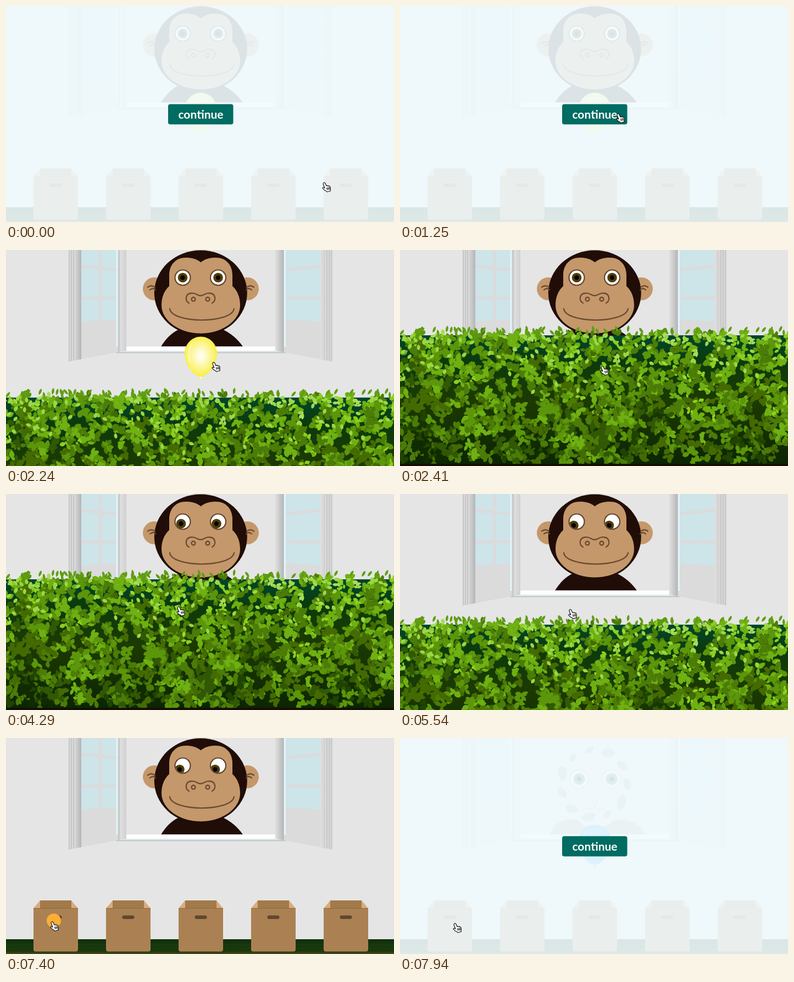
These frames come from a looping animation (706 px wide and 395 px high, 8 s). An HTML page:

```html
<!DOCTYPE html>
<html lang="en">
<head>
<meta charset="utf-8">
<title>Find the balloon</title>
<style>
html, body { margin: 0; width: 100%; height: 100%; overflow: hidden; background: #e5e5e5; }
svg { display: block; width: 100vw; height: 100vh; }
</style>
</head>
<body>
<svg viewBox="0 0 706 395">
  <defs>
    <linearGradient id="grass" x2="0" y2="1">
      <stop offset="0" stop-color="#0f2c0c"/><stop offset=".35" stop-color="#17390f"/>
      <stop offset=".85" stop-color="#1d3a0e"/><stop offset="1" stop-color="#54491a"/>
    </linearGradient>
    <linearGradient id="shade"><stop offset="0" stop-color="#d8d8d8"/><stop offset="1" stop-color="#b3b5b6"/></linearGradient>
    <linearGradient id="light"><stop offset="0" stop-color="#e0e0e0"/><stop offset="1" stop-color="#d0d0d0"/></linearGradient>
    <linearGradient id="soil" x2="0" y2="1">
      <stop offset="0" stop-color="#00462c"/><stop offset=".2" stop-color="#0c3a0c"/>
      <stop offset=".5" stop-color="#1c3a02"/><stop offset="1" stop-color="#0b2403"/>
    </linearGradient>
    <radialGradient id="yellow" cy=".48" r=".56">
      <stop offset="0" stop-color="#fffff4"/><stop offset=".18" stop-color="#fefce0"/>
      <stop offset=".75" stop-color="#faf267"/><stop offset="1" stop-color="#f8ee35"/>
    </radialGradient>
    <radialGradient id="blue" cy=".48" r=".56">
      <stop offset="0" stop-color="#6cc8f4"/><stop offset="1" stop-color="#0aa0f0"/>
    </radialGradient>
    <clipPath id="eyeClip"><circle r="13"/></clipPath>
    <g id="box">
      <path d="M12 297H69V312H12Z" fill="#a27a4b"/>
      <path d="M0 311.5L12 297V311.5ZM81 311.5L69 297V311.5Z" fill="#d9ac7d"/>
      <path d="M0 311H81V386.5Q81 390.5 77 390.5H4Q0 390.5 0 386.5Z" fill="#ab8153"/>
      <path d="M0 311.5H81" stroke="#8d683e"/>
      <rect x="29.5" y="324.5" width="22" height="6.5" rx="3.25" fill="#5f4730"/>
    </g>
    <g id="halfFace" fill="#c4986b">
      <path d="M355 23C347 16 338 14 327 14C309 14 297 27 297 46V66C287 75 283 88 283 101C283 129 315 152.500 355 152.500Z"/>
    </g>
  </defs>
  <rect width="706" height="395" fill="#e5e5e5"/>
  <g id="monkey">
    <g fill="#c4986b"><circle cx="270" cy="71" r="21"/><circle cx="439" cy="71" r="21"/></g>
    <path d="M282 176.500C291 162 301 152 313 146H396C408 152 421 162 431 176.500Z" fill="#200d08"/>
    <ellipse cx="354.300" cy="78.500" rx="84.500" ry="78" fill="#200d08"/>
    <use href="#halfFace"/><use href="#halfFace" transform="matrix(-1 0 0 1 709 0)"/>
    <g fill="none" stroke="#6b4a30" stroke-width="2.300" stroke-linecap="round">
      <path d="M258 68Q264 63 271 68M262 73Q267 68 272 73M451 68Q445 63 438 68M447 73Q442 68 437 73"/>
      <path d="M333 97C325 93 326 80 337 79C346 78 348 83.500 354 83.500S362 78 371 79C382 80 383 93 375 97"/>
      <circle cx="341" cy="90" r="3.500"/><circle cx="367" cy="90" r="3.500"/>
      <path d="M298 107.500C302 135 410 135 415 107.500"/>
    </g>
    <g id="eyes"></g>
  </g>
  <g id="cub">
    <ellipse cx="355" cy="90" rx="60" ry="62" fill="#e9e5de"/>
    <path d="M272 176.500C280 154 296 148 322 149C342 170 368 170 392 149C420 149 438 158 447 176.500Z" fill="#a9a89c"/>
    <path id="mane" fill="#aeac9e"/>
    <g id="cubEyes"></g>
    <path d="M344 111L354 119L364 111M354 119V126Q344 135 336 127M354 126Q364 135 372 127" fill="none" stroke="#c4bdb2" stroke-width="2"/>
  </g>
  <g id="window"></g>
  <rect y="368" width="706" height="27" fill="url(#grass)"/>
  <path d="M0 374.500H706M0 381.500H706M0 387.500H706" stroke="#0d270a" opacity=".5"/>
  <g id="boxes"></g>
  <g id="balloon">
    <path d="M354.500 230L350.500 237Q354.500 234.500 358.500 237Z"/>
    <path d="M354.500 158.500C371 158.500 384 172 384 190C384 210 368 231.500 354.500 231.500S325 210 325 190C325 172 338 158.500 354.500 158.500Z"/>
    <path d="M333 206C327 190 331 175 341 167C335 180 333 190 337 207Z" fill="#fff" opacity=".35"/>
  </g>
  <g id="hedge"></g>
  <g id="veil">
    <rect width="706" height="395" fill="#f1fbfe" opacity=".9"/>
    <rect x="295" y="179.500" width="118.500" height="37" rx="4" fill="#006c62"/>
    <text x="354.500" y="206" text-anchor="middle" fill="#fff" font-family="Lato, 'Open Sans', sans-serif" font-weight="700" font-size="21">continue</text>
  </g>
  <circle id="tap" cx="87" cy="334" r="13" fill="#fcad35"/>
  <g id="hand" stroke="#111" stroke-width="1.200" stroke-linejoin="round" stroke-linecap="round">
    <path fill="#fff" d="M3.200 1.200Q5 .4 6 2.400L8 7Q9.400 5.800 10.400 7.200Q12 6 12.800 7.600Q14.400 7 15 9Q16 12 15 14.500L15.500 16L9 18L7.800 16.500Q4 15.500 1.200 11.500Q.8 9.600 3 10L5 11L2.200 4Q1.600 2 3.200 1.200Z"/>
    <path fill="none" d="M8.600 10.500l1 3.500M10.800 10l1 3.500M13 9.500l.8 3.500"/>
  </g>
</svg>
<script>
const LOOP = 8000;
const $ = id => document.getElementById(id);
const move = (el, x, y) => el.setAttribute('transform', `translate(${x} ${y})`);
const show = (id, on) => $(id).style.display = on ? '' : 'none';
const clamp = (v, lo, hi) => Math.max(lo, Math.min(hi, v));
const ramp = (t, start, end) => clamp((t - start) / (end - start), 0, 1);
const swing = (t, start, end) => .5 - Math.cos(Math.PI * ramp(t, start, end)) / 2;

let seed = 11;
function rnd() {
  seed = (seed * 1664525 + 1013904223) >>> 0;
  return seed / 4294967296;
}

const poly = (pts, fill) => `<polygon points="${pts.join(' ')}" fill="${fill}"/>`;

// Both shutters share one slope: lowest at the outer edge, highest at the sill
const sillEdge = x => 204 - 20 * clamp((240 - Math.abs(x - 354.5)) / 105, 0, 1);
const strip = (x, w, fill) => poly([x, -1, x + w, -1, x + w, sillEdge(x + w), x, sillEdge(x)], fill);

function moulding(x) {
  let out = '';
  for (let i = 0; i < 3; i++) out += strip(x + i * 4, 2, '#c5c5c5');
  return out;
}

// Panes converge towards the inner edge of each shutter
function panes(outer, inner, bar) {
  const y = (x, v) => 86 + (v - 86) * (1 - .11 * (x - outer) / (inner - outer));
  let out = '';
  for (const [a, b] of [[outer, bar - 3], [bar + 2.5, inner]])
    for (let row = 0; row < 4; row++) {
      const top = row * 58 - 86 + 3, bottom = top + (row < 3 ? 52 : 40);
      out += poly([a, y(a, top), b, y(b, top), b, y(b, bottom), a, y(a, bottom)], '#cde4e9');
    }
  return out;
}

function buildWindow() {
  const sill = (x, y, w, h, fill) => `<rect x="${x}" y="${y}" width="${w}" height="${h}" fill="${fill}"/>`;
  $('window').innerHTML =
    sill(215, 176.5, 279, 9, '#fff') + sill(200, 184.5, 310, 2.5, '#dbe3e6') + sill(200, 187, 310, 1.5, '#b5c2c7') +
    strip(114, 105, '#dbdbdb') + moulding(114) + strip(125, 12, 'url(#shade)') +
    panes(137, 203, 172) + strip(203.5, 4, '#c6cacc') + strip(207.5, 11.5, 'url(#light)') +
    strip(490, 104.5, '#dbdbdb') + strip(493, 12.5, 'url(#shade)') +
    panes(572, 506, 540.5) + strip(572, 9, 'url(#light)') + moulding(583) +
    [200.500, 506].map(x => sill(x, 0, 3, 177, '#e4f5f8')).join('');
}

function leaf(x, y, len, wide, angle) {
  const c = Math.cos(angle), s = Math.sin(angle);
  const p = (u, v) => (x + u * c - v * s).toFixed(1) + ' ' + (y + u * s + v * c).toFixed(1);
  return `M${p(-len, 0)}C${p(-len * .5, -wide)} ${p(len * .6, -wide)} ${p(len, 0)}` +
    `C${p(len * .6, wide)} ${p(-len * .5, wide)} ${p(-len, 0)}Z`;
}

function sprig(x, y, count, size) {
  let d = '';
  for (let i = 0; i < count; i++) {
    const angle = rnd() * 6.28, len = size * (.75 + rnd() * .5), out = len * (.6 + rnd() * .8);
    d += leaf(x + Math.cos(angle) * out, y + Math.sin(angle) * out, len, len * (.55 + rnd() * .4), angle + rnd() - .5);
  }
  return d;
}

function buildHedge() {
  const greens = ['#102a02', '#1f4300', '#315804', '#446a02', '#4c7c08', '#5c960a', '#6fb012', '#8ccf20', '#a9dc5a'];
  let out = '<rect y="156" width="706" height="239" fill="url(#soil)"/>';
  for (let layer = 0; layer < 10; layer++) {
    const paths = greens.map(() => '');
    for (let i = 0; i < 100; i++) {
      const x = rnd() * 720 - 7, depth = rnd() ** 1.15, y = 155 + depth * 232;
      const columns = Math.cos((x - 345) / 31) * .12 * depth;
      const patch = Math.sin(x / 17) * Math.cos(y / 21 + x / 60) * .07 + x / 7000;
      const level = .66 - depth * .34 + columns + patch + (rnd() - .5) * .5;
      const tone = clamp(Math.floor(level * 9), 0, 8);
      paths[tone] += tone > 6 ? sprig(x, y, 3, 4.5) : sprig(x, y, 5, 6);
    }
    greens.forEach((g, i) => out += `<path d="${paths[i]}" fill="${g}"/>`);
  }
  // Small loose leaves: pale ones near the top, shoots above the edge
  let pale = '', shoots = '';
  for (let i = 0; i < 130; i++) pale += leaf(rnd() * 706, 156 + rnd() * rnd() * 110, 5, 4, rnd() * 6.28);
  for (let i = 0; i < 70; i++) shoots += leaf(rnd() * 706, 154 - rnd() * 10, 6, 3, -.8 - rnd() * 1.6);
  $('hedge').innerHTML = out + `<path d="${pale}" fill="#9bd748"/><path d="${shoots}" fill="#5f9d14"/>` +
    '<rect y="391" width="706" height="4" fill="#150f06"/>';
}

function buildRest() {
  $('boxes').innerHTML = [0, 1, 2, 3, 4].map(i => `<use href="#box" x="${50 + 132 * i}"/>`).join('');
  $('eyes').innerHTML = [321.5, 386].map(x => `<g transform="translate(${x} 50.5)">
    <circle r="14" fill="#fff" stroke="#65452d" stroke-width="2.200"/>
    <g clip-path="url(#eyeClip)"><g class="iris"><circle r="8.800" fill="#4f3d08"/><circle r="4.200" fill="#0a0502"/></g></g></g>`).join('');
  $('cubEyes').innerHTML = [326, 385].map(x => `<g transform="translate(${x} 75)">
    <circle r="17" fill="#f4f1ec" stroke="#cdbfb2" stroke-width="2"/>
    <circle r="10.500" fill="#3f7f72"/><circle r="4.500" fill="#000"/></g>`).join('');
  let mane = '';
  for (let i = 0; i < 11; i++) {
    const a = i * Math.PI * 2 / 11 - 1.7, r = 9 + 5 * Math.abs(Math.sin(i * 1.9));
    mane += leaf(353 + 60 * Math.cos(a), 83 + 62 * Math.sin(a), r, r * .8, a + 1.2);
  }
  $('mane').setAttribute('d', mane);
}

// Each trip: start, end, then the place it leads to
const trips = [[300, 710, 403, 193], [1000, 1520, 382, 199], [2100, 2410, 364, 211], [2410, 3480, 353, 262],
  [3600, 4290, 310, 205], [4290, 5540, 306, 210], [5540, 6250, 146, 278], [6250, 6780, 80, 335], [7600, 7940, 96, 338]];

function handAt(t) {
  let x = 575, y = 322;
  for (const [start, end, toX, toY] of trips) {
    const p = ramp(t, start, end);
    x += (toX - x) * p;
    y += (toY - y) * p;
  }
  return [x, y];
}

function draw(t) {
  const next = t >= 7490;
  show('veil', t < 1700 || next);
  show('monkey', !next);
  show('cub', next);
  show('balloon', t < 2410 || next);
  $('balloon').setAttribute('fill', `url(#${next ? 'blue' : 'yellow'})`);
  show('tap', t >= 7050 && !next);

  const drop = 300 * (1 - swing(t, 2010, 2410) + swing(t, 5400, 5800));
  show('hedge', drop < 262);
  move($('hedge'), 0, drop);
  move($('hand'), ...handAt(t));

  // A short glance up, then a slow look towards the first box
  const glance = swing(t, 2500, 2900) - swing(t, 2960, 3120), look = swing(t, 3500, 5000);
  document.querySelectorAll('.iris').forEach(el => move(el, 1.5 * glance - 5.5 * look, 7 * look - 2 * glance));
}

buildWindow();
buildHedge();
buildRest();
const began = performance.now();
function tick() {
  draw((performance.now() - began) % LOOP);
  requestAnimationFrame(tick);
}
tick();
</script>
</body>
</html>
```
